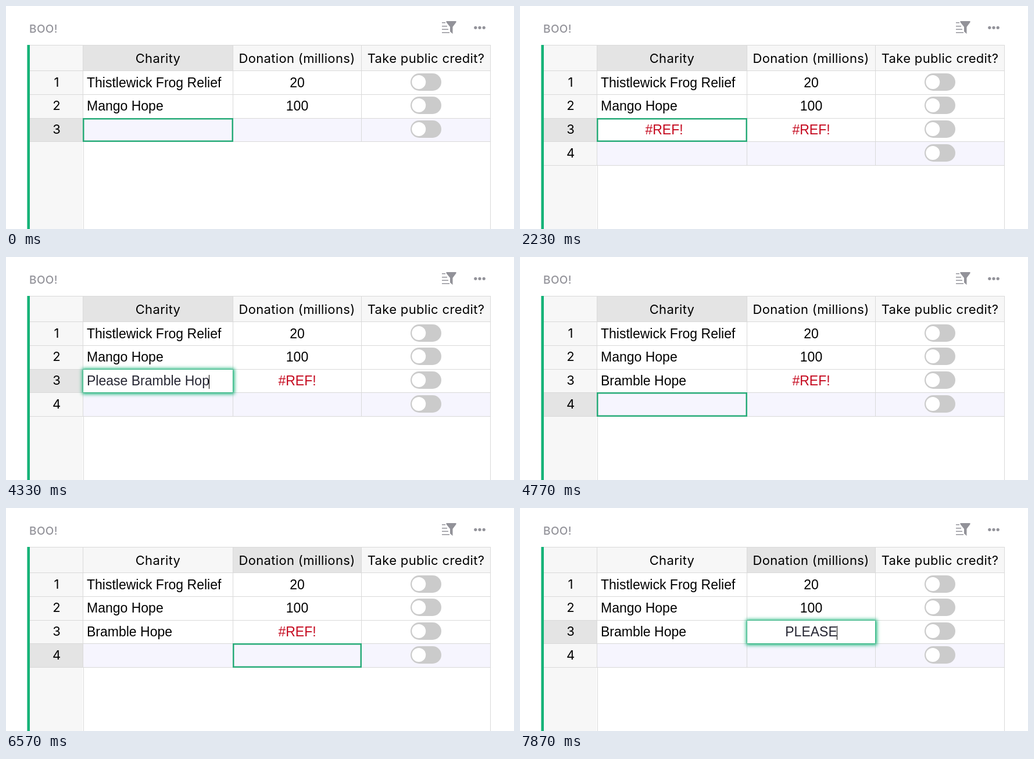
These frames come from a looping animation (874x384 px, 8000 ms). An HTML page with a canvas:

```html
<!DOCTYPE html>
<html lang="en">
<head>
<meta charset="utf-8">
<title>Charity table</title>
<style>
html, body { margin: 0; width: 100%; height: 100%; overflow: hidden; background: #fff; }
canvas { display: block; }
</style>
</head>
<body>
<canvas id="stage" width="874" height="384"></canvas>
<script>
const ctx = document.getElementById('stage').getContext('2d');
const LOOP = 8000;
const UI = 'Inter, "Noto Sans", sans-serif';
const CELL = '23px "Liberation Sans", Arial, sans-serif';
const GREEN = '#16b378', OUTLINE = '#27ab78', LINE = '#d9d9d9', PALE = '#f7f7f7';
const DARK = '#e4e4e4', NEW_ROW = '#f6f5fe', GREY = '#929299', ERROR = '#c5091f';
const X = [41, 132, 390, 611, 833];      // column edges
const Y = [67, 111, 152, 193, 233, 274]; // row edges
const REF = '#REF!';
const FUND = 'Bramble Hope', ASK = 'Please ' + FUND;

const START = { rows: 3, col: 1, row: 3, edit: null, caret: true, name: '', gift: '' };
const steps = [];
const at = (time, change) => steps.push([time, change]);

function type(time, gap, text, before = '') {
  for (let i = 1; i <= text.length; i++) {
    at(time + (i - 1) * gap, { edit: before + text.slice(0, i), caret: true });
  }
}

type(500, 70, FUND);
at(1330, { caret: false });
at(1430, { edit: null, name: FUND });
at(1600, { rows: 4, row: 4, name: REF, gift: REF });
at(2230, { row: 3 });
at(2730, { edit: '', caret: true });
type(2770, 60, 'Please');
type(3270, 0, ' ', 'Please');
type(3470, 75, ASK.slice(7, 10), ASK.slice(0, 7));
type(3770, 80, ASK.slice(10, 18), ASK.slice(0, 10));
type(4400, 0, ASK.slice(18), ASK.slice(0, 18));
at(4570, { edit: null, row: 4, name: ASK });
at(4630, { name: FUND });
at(5030, { col: 2 });
at(5230, { row: 3 });
type(6300, 65, '100');
at(6500, { edit: null, row: 4, gift: '100' });
at(6570, { gift: REF });
at(7100, { row: 3 });
type(7500, 70, 'PLEASE');

function stateAt(time) {
  const state = { ...START };
  for (const [start, change] of steps) {
    if (start <= time) Object.assign(state, change);
  }
  return state;
}

function box(x0, y0, x1, y1, color) {
  ctx.fillStyle = color;
  ctx.fillRect(x0, y0, x1 - x0, y1 - y0);
}

function text(str, x, y, font, color = '#000', align = 'center') {
  ctx.font = font;
  ctx.fillStyle = color;
  ctx.textAlign = align;
  ctx.fillText(str, x, y);
}

function shape(points, color) {
  ctx.fillStyle = color;
  ctx.beginPath();
  points.forEach(([x, y]) => ctx.lineTo(x, y));
  ctx.fill();
}

function disc(x, y, r, color) {
  ctx.fillStyle = color;
  ctx.beginPath();
  ctx.arc(x, y, r, 0, Math.PI * 2);
  ctx.fill();
}

function toggle(y) {
  ctx.fillStyle = '#cbcbcb';
  ctx.beginPath();
  ctx.roundRect(696, y - 15, 53, 30, 15);
  ctx.fill();
  disc(710.2, y, 12, '#fff');
}

function drawTop() {
  ctx.letterSpacing = '0.4px';
  text('BOO!', 40, 46, '500 19px ' + UI, GREY, 'left');
  ctx.letterSpacing = '0px';
  [[28, 756], [34, 759], [39.5, 761], [45, 763]].forEach(([y, end]) => box(750, y, end, y + 1.5, GREY));
  shape([[757.5, 26], [774.5, 26], [774.5, 28], [768.5, 36], [768.5, 48], [764, 44], [764, 36], [757.5, 28]], GREY);
  [807.8, 815, 822.2].forEach(x => disc(x, 37.3, 2.6, GREY));
}

function drawGrid(s) {
  box(X[0], Y[0], X[1], 384, PALE);
  box(X[1], Y[0], X[4], Y[1], PALE);
  box(X[s.col], Y[0], X[s.col + 1], Y[1], DARK);
  box(X[0], Y[s.row], X[1], Y[s.row + 1], DARK);
  box(X[1], Y[s.rows], X[4], Y[s.rows + 1], NEW_ROW);

  const bottom = Y[s.rows + 1];
  for (const y of Y.slice(0, s.rows + 2)) box(X[0], y, X[4] + 1, y + 1, LINE);
  for (const x of X.slice(1, 4)) box(x, Y[0], x + 1, bottom, LINE);
  box(133, bottom, 134, 384, LINE);
  box(X[4], Y[0], X[4] + 1, 384, LINE);
  box(36.4, Y[0], 41, 384, GREEN);
}

function drawValue(str, col, row, color = '#000') {
  const y = [0, 140, 180, 221][row];
  if (str === REF) color = ERROR;
  if (col === 1 && str !== REF) text(str, 139, y, CELL, color, 'left');
  else text(str, col === 1 ? 248 : 501, y, CELL, color);
}

function drawCursor(s) {
  const x = X[s.col], y = Y[s.row];
  ctx.strokeStyle = OUTLINE;
  ctx.lineWidth = 2.5;
  ctx.strokeRect(x + 1.25, y + 1.25, X[s.col + 1] - x - 1.5, Y[s.row + 1] - y - 1.5);
}

function drawEditor(s) {
  const x = X[s.col], y = Y[s.row], w = X[s.col + 1] - x + 1, h = Y[s.row + 1] - y + 1;
  ctx.save();
  ctx.shadowColor = GREEN;
  ctx.shadowBlur = 6;
  ctx.shadowOffsetX = 2000;
  ctx.fillRect(x - 2001.5, y - 1.5, w + 3, h + 3);
  ctx.restore();
  box(x + 0.5, y + 0.5, x + w - 0.5, y + h - 0.5, OUTLINE);
  box(x + 1, y + 1, x + w - 1, y + h - 1, '#fff');

  drawValue(s.edit, s.col, s.row, '#262633');
  if (!s.caret) return;
  ctx.font = CELL;
  const width = ctx.measureText(s.edit).width;
  const end = Math.floor(s.col === 1 ? 139 + width : 501 + width / 2);
  box(end, 203, end + 1, 227, '#000');
}

function draw(time) {
  const s = stateAt(time);
  box(0, 0, 874, 384, '#fff');
  drawTop();
  drawGrid(s);

  const label = '22px ' + UI;
  ctx.letterSpacing = '0.33px';
  text('Charity', 261.5, 98, label);
  text('Donation (millions)', 500.5, 98, label);
  text('Take public credit?', 722.5, 98, label);
  ctx.letterSpacing = '0px';
  for (let row = 1; row <= s.rows; row++) {
    text(row, 87, [0, 139, 179, 220, 261][row], label);
    toggle([0, 131, 171, 212, 253][row]);
  }

  drawValue('Thistlewick Frog Relief', 1, 1);
  drawValue('20', 2, 1);
  drawValue('Mango Hope', 1, 2);
  drawValue('100', 2, 2);
  drawValue(s.name, 1, 3);
  drawValue(s.gift, 2, 3);

  if (s.edit === null) drawCursor(s);
  else drawEditor(s);
}

const began = performance.now();
function tick() {
  draw((performance.now() - began) % LOOP);
  requestAnimationFrame(tick);
}
tick();
</script>
</body>
</html>
```
